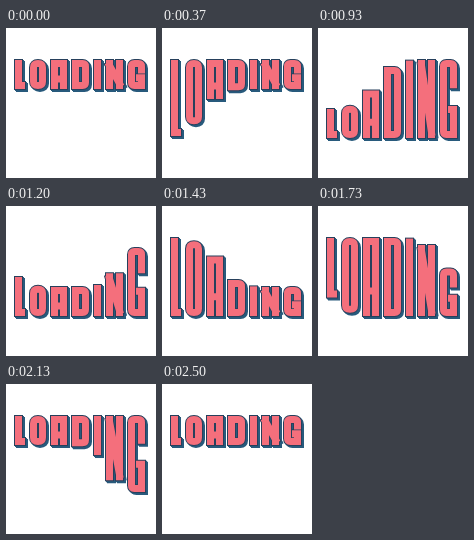
An HTML page with a canvas that plays this animation: 150 px wide and 150 px high, repeating every 2.53 s.

```html
<!DOCTYPE html>
<html lang="en">
<head>
<meta charset="utf-8">
<title>Loading</title>
<style>
  html, body { margin: 0; width: 100%; height: 100%; overflow: hidden; background: #fff; }
  canvas { display: block; width: 150px; height: 150px; }
</style>
</head>
<body>
<canvas id="stage" width="150" height="150" role="img" aria-label="LOADING"></canvas>
<script>
const ctx = document.getElementById('stage').getContext('2d');

const LOOP = 2530, FRAMES = 76, STEP = 100 / 3;
const PHASE = 500, LAG = PHASE / 6;
const TOP = 31, BOTTOM = 62, DROP = 49;
const STEM = 7, EDGE = 1, DEPTH = 2;
const PINK = '#f46f7c', NAVY = '#27405c', BLUE = '#285a7c';

// Centre lines of each letter between the heights t and b
const mix = (t, b, k) => t + (b - t) * k;
const letters = [
  (t, b) => `M12.5 ${t}V${b}H15.5`,
  (t, b) => `M32 ${t}Q36.5 ${t} 36.5 ${t + 4}V${b - 4}Q36.5 ${b} 32 ${b}Q27.5 ${b} 27.5 ${b - 4}V${t + 4}Q27.5 ${t} 32 ${t}Z`,
  (t, b) => `M48.5 ${b}V${t}H57.5V${b}M48.5 ${mix(t, b, .7)}H57.5`,
  (t, b) => `M69.5 ${t}H76.5Q79.5 ${t} 79.5 ${t + 3}V${b - 3}Q79.5 ${b} 76.5 ${b}H69.5Z`,
  (t, b) => `M91.5 ${t}V${b}`,
  (t, b) => `M103.5 ${t}V${b}M113.5 ${t}V${b}M103.5 ${t + 2}L113.5 ${b - 2}`,
  (t, b) => `M135.5 ${mix(t, b, .3)}V${t + 3}Q135.5 ${t} 132.5 ${t}H128.5Q125.5 ${t} 125.5 ${t + 3}` +
    `V${b - 3}Q125.5 ${b} 128.5 ${b}H135.5V${mix(t, b, .65)}H133.5`
];

function ease(time) {
  const p = Math.min(1, Math.max(0, time / PHASE));
  return p < .5 ? 8 * p ** 4 : 1 - 8 * (1 - p) ** 4;
}

// The bottom falls, the top follows, the top rises, the bottom follows
function outline(letter, i, time) {
  const at = phase => ease(time - i * LAG - phase * PHASE);
  const inset = STEM / 2 + EDGE;
  const top = TOP + DROP * (at(1) - at(2));
  const bottom = BOTTOM + DROP * (at(0) - at(3));
  return new Path2D(letter(top + inset, bottom - inset));
}

function trace(paths, color, width, shift = 0) {
  ctx.strokeStyle = color;
  ctx.lineWidth = width;
  ctx.save();
  ctx.translate(shift, shift);
  paths.forEach(path => ctx.stroke(path));
  ctx.restore();
}

function draw(time) {
  ctx.fillStyle = '#fff';
  ctx.fillRect(0, 0, 150, 150);
  ctx.lineCap = 'square';
  ctx.lineJoin = 'miter';
  const paths = letters.map((letter, i) => outline(letter, i, time));
  const full = STEM + 2 * EDGE;
  for (let d = DEPTH; d > 0; d--) trace(paths, BLUE, full, d);
  trace(paths, NAVY, full);
  trace(paths, PINK, STEM);
}

const start = performance.now();
function tick() {
  const t = (performance.now() - start) % LOOP;
  draw(Math.floor(t / LOOP * FRAMES + .1) * STEP);
  requestAnimationFrame(tick);
}
tick();
</script>
</body>
</html>
```
